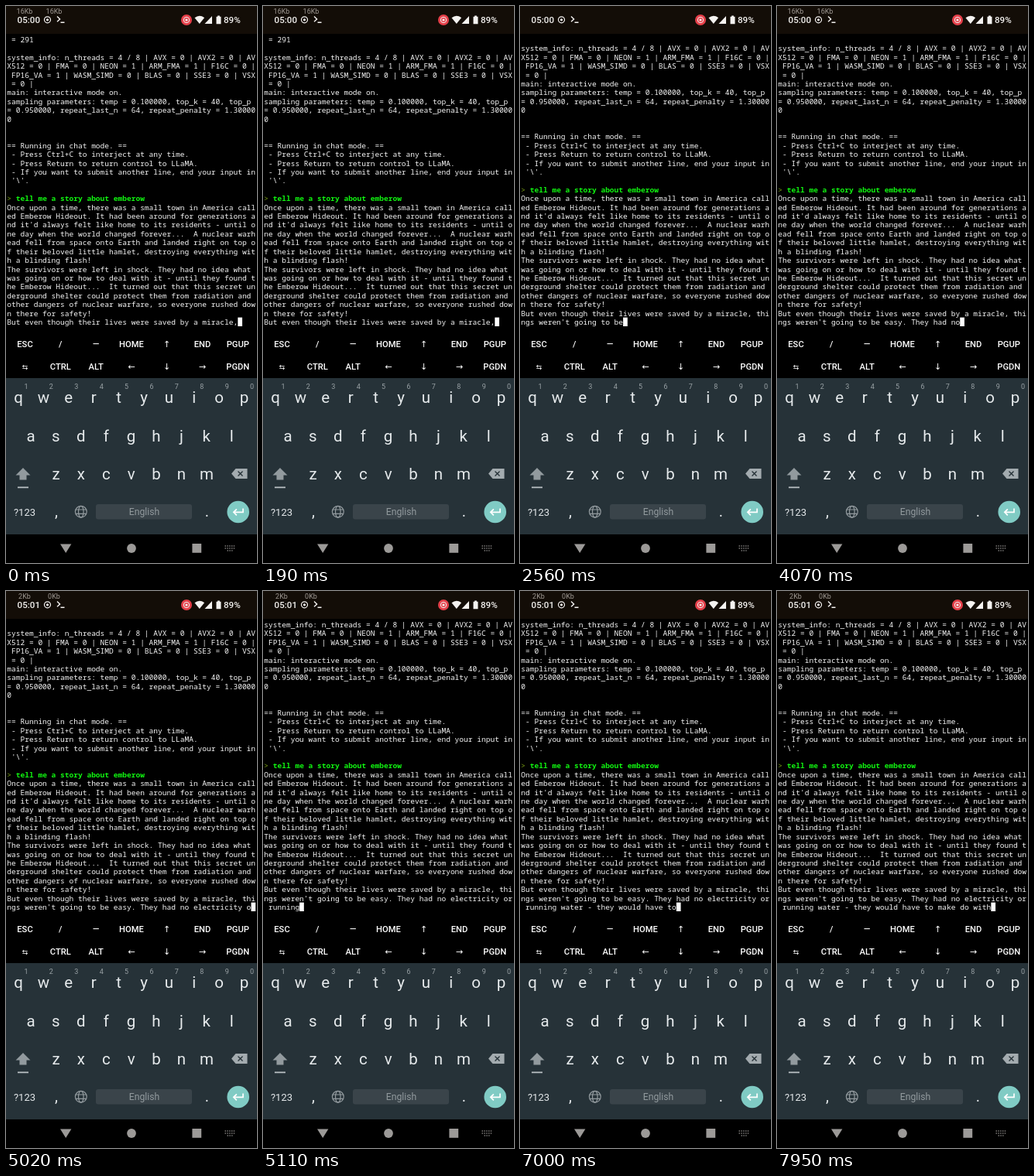
An HTML page that plays this animation: 324x720 px, repeating every 8000 ms.

```html
<!DOCTYPE html>
<html lang="en">
<head>
<meta charset="utf-8">
<title>Terminal chat</title>
<style>
html, body { margin: 0; width: 100%; height: 100%; overflow: hidden; background: #000; }
svg { display: block; width: 100vw; height: 100vh; }
text { white-space: pre; font-family: Roboto, "DejaVu Sans", sans-serif; }
#term text { font: 500 9.55px "Noto Sans Mono", "DejaVu Sans Mono", monospace; fill: #f6f6f6; }
#term .cmd { font-weight: 700; fill: #10f510; }
#term .mark { fill: #7da414; }
.mid { text-anchor: middle; }
</style>
</head>
<body>
<svg id="stage" viewBox="0 0 324 720" xmlns="http://www.w3.org/2000/svg">
  <rect width="324" height="720" fill="#000"/>
  <g id="term"></g>
  <rect id="cursor" y="402.6" width="5.7" height="11.4" fill="#fff"/>

  <rect width="324" height="36" fill="#130d07"/>
  <g id="status" fill="#f4f2f0">
    <text id="clock" x="14.6" y="22" font-size="11.6" font-weight="500"></text>
    <text id="down" class="mid" x="24" y="9.5" font-size="9" fill="#a09a94"></text>
    <text id="up" class="mid" x="62" y="9.5" font-size="9" fill="#a09a94"></text>
    <circle cx="53.5" cy="17.8" r="4" fill="none" stroke="#f4f2f0" stroke-width="1.2"/>
    <circle cx="53.5" cy="17.8" r="1.6"/>
    <path d="M66 13.5l3.6 3.4-3.6 3.4M70.5 21.3h5" fill="none" stroke="#f4f2f0" stroke-width="1.4"/>
    <circle cx="233" cy="18" r="7" fill="#e5404a"/>
    <circle cx="233" cy="18" r="3.7" fill="none" stroke="#f4f2f0" stroke-width="1"/>
    <circle cx="233" cy="18" r="1.6"/>
    <path d="M243.5 15.2q6.3-5 12.6 0L249.8 23z"/>
    <path d="M266 13v10h-9.5z"/>
    <path d="M271.5 13.8h1.6v-1.3h2.8v1.3h1.6v9.4h-6z"/>
    <text x="281" y="22" font-size="11.6" font-weight="500">89%</text>
  </g>

  <g id="extra" fill="#fff"></g>

  <rect y="481" width="324" height="202" fill="#263238"/>
  <g id="keys" fill="#e6eaec"></g>
  <path d="M22 597l9.5 9.5h-5v6h-9v-6h-5z" fill="#929a9e"/>
  <path d="M15 622.3h14" stroke="#b6bcc0" stroke-width="1.8"/>
  <path d="M291 604.5l5.5-6.5h15v13h-15z" fill="#a3abaf"/>
  <path d="M299.5 601.5l6 6m0-6l-6 6" stroke="#263238" stroke-width="1.4"/>
  <g fill="none" stroke="#929a9e" stroke-width="1.2">
    <circle cx="96.8" cy="653.7" r="7.4"/>
    <ellipse cx="96.8" cy="653.7" rx="3.3" ry="7.4"/>
    <path d="M90 651h13.6M90 656.4h13.6"/>
  </g>
  <rect x="116" y="644" width="124" height="19.5" rx="3" fill="#3a444a"/>
  <text class="mid" x="178.5" y="658" font-size="12.2" fill="#929a9e">English</text>
  <circle cx="299.7" cy="654" r="14.3" fill="#80cbc4"/>
  <path d="M306 649.5v4.8h-12m3.8-4l-4 4 4 4" fill="none" stroke="#fff" stroke-width="1.7"/>

  <g fill="#9c9a98">
    <path d="M70 695.5h14.4L77.2 707z"/>
    <circle cx="162" cy="701" r="5.9"/>
    <rect x="240.4" y="695" width="11.8" height="11.8"/>
    <path d="M282.5 698h13M282.5 701h13M285.5 704h7" fill="none" stroke="#7c7a78" stroke-width="1.5" stroke-dasharray="1.5 1.3"/>
  </g>
</svg>
<script>
const LOOP = 8000, COLS = 56, ROWS = 33;
const CELL = 5.73, PITCH = 11.41, LEFT = 1.3, LAST = 412;
const TOKEN_MS = 315, TOKEN_LAG = 45;

const HISTORY = String.raw` = 291

system_info: n_threads = 4 / 8 | AVX = 0 | AVX2 = 0 | AVX512 = 0 | FMA = 0 | NEON = 1 | ARM_FMA = 1 | F16C = 0 | FP16_VA = 1 | WASM_SIMD = 0 | BLAS = 0 | SSE3 = 0 | VSX = 0 |
main: interactive mode on.
sampling parameters: temp = 0.100000, top_k = 40, top_p = 0.950000, repeat_last_n = 64, repeat_penalty = 1.300000


== Running in chat mode. ==
 - Press Ctrl+C to interject at any time.
 - Press Return to return control to LLaMA.
 - If you want to submit another line, end your input in '\'.

> tell me a story about emberow
Once upon a time, there was a small town in America called Emberow Hideout. It had been around for generations and it'd always felt like home to its residents - until one day when the world changed forever...  A nuclear warhead fell from space onto Earth and landed right on top of their beloved little hamlet, destroying everything with a blinding flash!
The survivors were left in shock. They had no idea what was going on or how to deal with it - until they found the Emberow Hideout...  It turned out that this secret underground shelter could protect them from radiation and other dangers of nuclear warfare, so everyone rushed down there for safety!
But even though their lives were saved by a miracle,`;

const TOKENS = " things| weren|'|t| going| to| be| easy|.| They| had| no| electric|ity| or| running| water| -| they| would| have| to| make| do| with".split("|");

// start time, clock, download rate, upload rate
const STATUS = [
  [0, "05:00", "16Kb", "16Kb"],
  [500, "05:00", "0Kb", "0Kb"],
  [1500, "05:00", "", ""],
  [3700, "05:00", "16Kb", "16Kb"],
  [4700, "05:01", "2Kb", "0Kb"]
];

const $ = id => document.getElementById(id);

function add(parent, tag, attrs, content = "") {
  const el = document.createElementNS("http://www.w3.org/2000/svg", tag);
  for (const name in attrs) el.setAttribute(name, attrs[name]);
  el.textContent = content;
  return parent.appendChild(el);
}

function label(parent, x, y, size, content, attrs = {}) {
  return add(parent, "text", { class: "mid", x, y, "font-size": size, ...attrs }, content);
}

function buildKeys() {
  const extra = ["ESC / — HOME ↑ END PGUP", "⇆ CTRL ALT ← ↓ → PGDN"];
  extra.forEach((row, r) => row.split(" ").forEach((key, i) =>
    label($("extra"), 24.5 + i * 45.8, 440.5 + r * 29.5, key === "⇆" ? 9 : 11.2, key, { "font-weight": 500 })));

  const rows = [["qwertyuiop", 16, 513], ["asdfghjkl", 32, 562.5], ["zxcvbnm", 64.5, 611.5]];
  for (const [chars, x, y] of rows)
    [...chars].forEach((c, i) => label($("keys"), x + i * 32.4, y, 20.5, c));
  [..."1234567890"].forEach((c, i) =>
    label($("keys"), 26 + i * 32.4, 495.3, 9, c, { fill: "#9aa2a6" }));
  label($("keys"), 24, 658.5, 13, "?123");
  label($("keys"), 65, 660, 20, ",");
  label($("keys"), 259.5, 660, 20, ".");
}

// Terminal wrap: break at the last column, even inside a word
function wrap(text) {
  return text.split("\n").flatMap(line => line.match(new RegExp(`.{1,${COLS}}`, "g")) || [""]);
}

const lines = Array.from({ length: ROWS }, (_, i) =>
  add($("term"), "text", { x: LEFT, y: LAST - (ROWS - 1 - i) * PITCH }));

let shown = -1;
function drawTerminal(count) {
  if (count === shown) return;
  shown = count;
  const rows = wrap(HISTORY + TOKENS.slice(0, count).join("")).slice(-ROWS);
  lines.forEach((el, i) => {
    const row = rows[i];
    el.textContent = "";
    if (row.startsWith("> ")) {
      add(el, "tspan", { class: "mark" }, "> ");
      add(el, "tspan", { class: "cmd" }, row.slice(2));
    } else el.textContent = row;
  });
  const col = Math.min(rows[ROWS - 1].length, COLS - 1);
  $("cursor").setAttribute("x", LEFT + col * CELL);
}

function draw(t) {
  const count = Math.floor((t - TOKEN_LAG) / TOKEN_MS);
  drawTerminal(Math.max(0, Math.min(TOKENS.length, count)));
  const [, clock, down, up] = STATUS.filter(s => s[0] <= t).pop();
  $("clock").textContent = clock;
  $("down").textContent = down;
  $("up").textContent = up;
}

function tick() {
  draw(performance.now() % LOOP);
  requestAnimationFrame(tick);
}

buildKeys();
tick();
</script>
</body>
</html>
```
